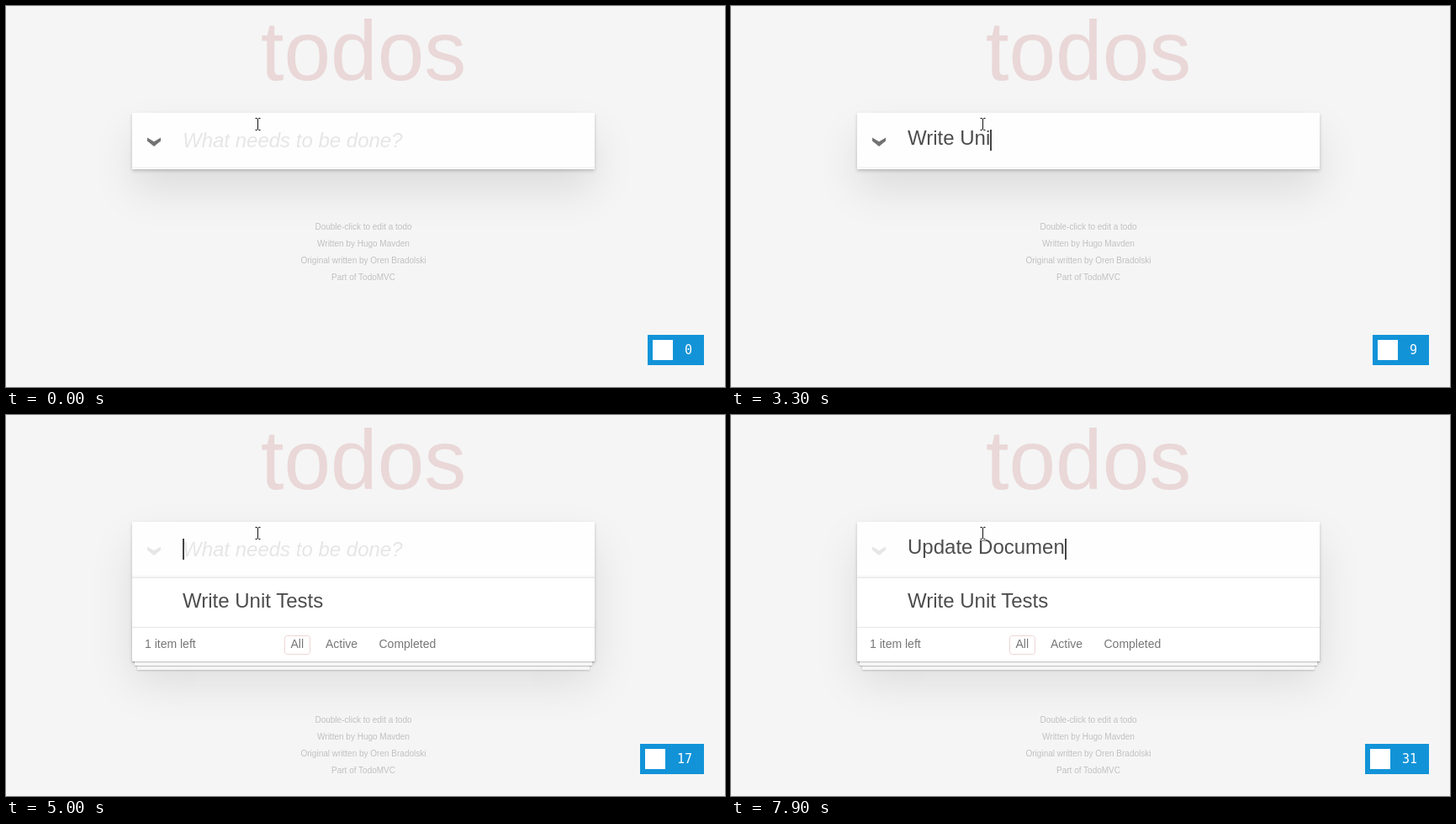
Write an HTML page that moves like this. It is 855 px wide and 453 px high and loops after 8000 ms.

```html
<!DOCTYPE html>
<html lang="en">
<head>
<meta charset="utf-8">
<title>todos</title>
<style>
  html, body { margin: 0; width: 100%; height: 100%; overflow: hidden; background: #f5f5f5; }
  div, svg { position: absolute; }
  .card {
    left: 150px; top: 127px; width: 550px; height: 67px; background: #fff;
    box-shadow: 0 2px 4px rgba(0,0,0,.2), 0 25px 50px rgba(0,0,0,.1);
  }
  .entry {
    width: 100%; height: 66px; background: rgba(0,0,0,.003);
    box-shadow: inset 0 -2px 1px rgba(0,0,0,.03);
  }
  .stack {
    bottom: 0; width: 100%; height: 50px;
    box-shadow: 0 1px 1px rgba(0,0,0,.2),
      0 8px 0 -3px #f6f6f6, 0 9px 1px -3px rgba(0,0,0,.2),
      0 16px 0 -6px #f6f6f6, 0 17px 2px -6px rgba(0,0,0,.2);
  }
  svg { left: 0; top: 0; }
  text { font-family: "Liberation Sans", Arial, sans-serif; white-space: pre; }
  .title { font-size: 100px; fill: rgba(175,47,47,.15); text-anchor: middle; }
  .task { font-size: 24px; fill: #4d4d4d; }
  .hint { font-size: 24px; font-style: italic; fill: #e6e6e6; }
  .filters { font-size: 14px; fill: #777; }
  .info { font-size: 10px; fill: #bfbfbf; text-anchor: middle; text-shadow: 0 1px 0 rgba(255,255,255,.5); }
  .count { font: 15px "DejaVu Sans Mono", monospace; fill: #fff; text-anchor: end; }
  .arrow { fill: #737373; }

  .list { visibility: hidden; }
  .filled .list { visibility: visible; }
  .filled .card { height: 166px; }
  .filled .arrow { fill: #e6e6e6; }
  .filled .info { transform: translateY(100px); }
</style>
</head>
<body>
<div class="card">
  <div class="entry"></div>
  <div class="stack list"></div>
</div>
<svg width="855" height="453" viewBox="0 0 855 453">
  <text class="title" x="425" y="88">todos</text>
  <path class="arrow" d="M168 156.5L176 161.3L184 156.5V160.6L176 167L168 160.6Z"/>
  <text class="hint" id="hint" x="210" y="168">What needs to be done?</text>
  <text class="task" id="draft" x="210" y="165"></text>
  <rect id="caret" y="147" width="2" height="25" fill="#444"/>

  <g class="list">
    <path d="M150 193.5h550M150 252.5h550" stroke="#e6e6e6"/>
    <text class="task" id="item" x="210" y="229"></text>
    <rect x="331.5" y="262.5" width="30" height="22" rx="3" fill="none" stroke="#efd5d5"/>
    <g class="filters">
      <text x="165" y="277">1 item left</text>
      <text x="338.5" y="277">All</text>
      <text x="380" y="277">Active</text>
      <text x="443.5" y="277">Completed</text>
    </g>
  </g>

  <g class="info">
    <text x="425" y="266">Double-click to edit a todo</text>
    <text x="425" y="286">Written by Hugo Mavden</text>
    <text x="425" y="306">Original written by Oren Bradolski</text>
    <text x="425" y="326">Part of TodoMVC</text>
  </g>

  <rect id="badge" y="391" height="36" fill="#1293d8"/>
  <rect id="mark" y="397" width="24" height="24" fill="#fff"/>
  <text class="count" id="count" x="816" y="414"></text>

  <!-- mouse pointer -->
  <g fill="none">
    <path id="beam" d="M296.5 133.5h2l1 1l1 -1h2M299.5 134v13M296.5 147.5h2l1 -1l1 1h2" stroke="#fff" stroke-width="3"/>
    <use href="#beam"/>
    <path d="M296.5 133.5h2l1 1l1 -1h2M299.5 134v13M296.5 147.5h2l1 -1l1 1h2" stroke="#111"/>
  </g>
</svg>
<script>
const LOOP = 8000;
const KEYS = "Write Unit Tests\nUpdate Documen";
// Key press times in tenths of a second
const PRESSES = [
  15, 16, 17, 19, 20, 21, 29, 31, 32, 34, 36, 40, 41, 43, 44, 45, 50,
  60, 62, 63, 64, 66, 67, 68, 70, 72, 73, 75, 77, 78, 79
];
const el = id => document.getElementById(id);
const [hint, draft, caret, item, badge, mark, count] =
  ["hint", "draft", "caret", "item", "badge", "mark", "count"].map(el);
const show = (node, on) => node.setAttribute("visibility", on ? "visible" : "hidden");

const ruler = document.createElement("canvas").getContext("2d");
ruler.font = '24px "Liberation Sans", Arial, sans-serif';

function render(t) {
  const pressed = PRESSES.filter(p => p * 100 <= t).length;
  const lines = KEYS.slice(0, pressed).split("\n");
  const text = lines[lines.length - 1];
  const filled = lines.length > 1;

  document.body.classList.toggle("filled", filled);
  item.textContent = filled ? lines[0] : "";
  draft.textContent = text;
  show(hint, !text);

  show(caret, t >= 700 && !(t >= 5600 && t < 6000));
  caret.setAttribute("x", Math.round(210 + ruler.measureText(text).width));

  const left = pressed > 9 ? 754 : 763;
  badge.setAttribute("x", left);
  badge.setAttribute("width", 830 - left);
  mark.setAttribute("x", left + 6);
  count.textContent = pressed;
}

const start = performance.now();
function tick() {
  render((performance.now() - start) % LOOP);
  requestAnimationFrame(tick);
}
tick();
</script>
</body>
</html>
```
